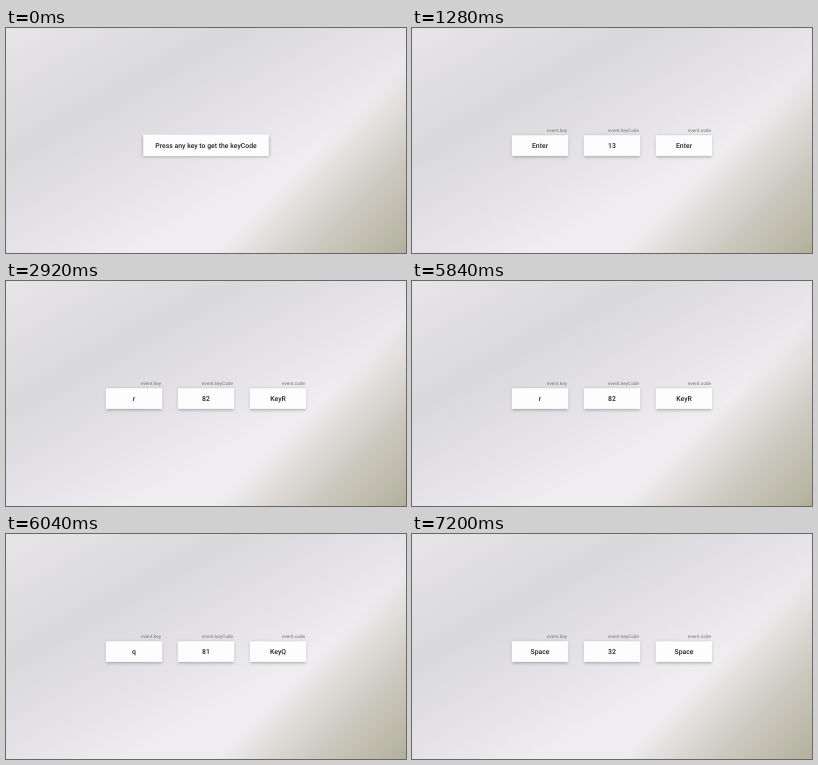
An HTML page with a canvas that plays this animation: 400x225 px, repeating every 8000 ms.

```html
<!DOCTYPE html>
<html lang="en">
<head>
<meta charset="utf-8">
<title>Key codes</title>
<style>
  html, body { margin: 0; width: 100%; height: 100%; overflow: hidden; background: #e4e2e5; }
  canvas { display: block; width: 400px; height: 225px; }
</style>
</head>
<body>
<canvas id="stage" width="400" height="225"></canvas>
<script>
const canvas = document.getElementById('stage');
const ctx = canvas.getContext('2d');
const LOOP = 8000;

// Each key press: start time, event.key, event.keyCode, event.code
const presses = [
  [1280, 'Enter', '13', 'Enter'],
  [2920, 'r', '82', 'KeyR'],
  [4320, 'g', '71', 'KeyG'],
  [5840, 'r', '82', 'KeyR'],
  [5907, 'e', '69', 'KeyE'],
  [5973, 'w', '87', 'KeyW'],
  [6040, 'q', '81', 'KeyQ'],
  [7200, 'Space', '32', 'Space']
];
const labels = ['event.key', 'event.keyCode', 'event.code'];

function fillGradient(x0, y0, x1, y1, stops) {
  const gradient = ctx.createLinearGradient(x0, y0, x1, y1);
  for (const [at, color] of stops) gradient.addColorStop(at, color);
  ctx.fillStyle = gradient;
  ctx.fillRect(0, 0, 400, 225);
}

function drawBackground() {
  fillGradient(0, 0, 192.3, 341.8, [
    [0, '#e7e5e8'], [0.29, '#d9d8db'], [0.5, '#e5e3e7'], [0.66, '#f0edf1'], [1, '#f0edf1']
  ]);
  fillGradient(217, 217, 312.5, 312.5, [
    [0, 'rgba(178,176,156,0)'], [0.14, 'rgba(178,176,156,0.18)'],
    [0.5, 'rgba(178,176,156,0.58)'], [1, 'rgba(178,176,156,1)']
  ]);
}

function drawCard(x, y, w, h) {
  ctx.save();
  ctx.shadowColor = 'rgba(0,0,0,0.32)';
  ctx.shadowBlur = 3;
  ctx.shadowOffsetY = 0.8;
  ctx.fillStyle = '#fefdfe';
  ctx.fillRect(x, y, w, h);
  ctx.restore();
}

// Laid out large and scaled down so that small glyphs keep exact spacing.
function drawText(text, x, y, size, color, align) {
  ctx.save();
  ctx.translate(x, y);
  ctx.scale(1 / 3, 1 / 3);
  ctx.font = `500 ${size * 3}px Roboto, sans-serif`;
  ctx.textRendering = 'geometricPrecision';
  ctx.textAlign = align;
  ctx.fillStyle = color;
  ctx.fillText(text, 0, 0);
  ctx.restore();
}

function drawPrompt() {
  drawCard(137.2, 106.7, 125.6, 21.4);
  drawText('Press any key to get the keyCode', 200, 119.6, 6.87, '#222', 'center');
}

function drawPress(values) {
  labels.forEach((label, i) => {
    const center = 128 + i * 72;
    drawText(label, center + 27, 103.5, 4.7, '#888', 'right');
    drawCard(center - 28.2, 107.2, 56.4, 20.7);
    drawText(values[i], center, 119.8, 6.87, '#222', 'center');
  });
}

function render(now) {
  const time = now % LOOP;
  const press = presses.filter(([start]) => start <= time).pop();
  drawBackground();
  if (press) drawPress(press.slice(1));
  else drawPrompt();
}

const origin = performance.now();
function tick() {
  render(performance.now() - origin);
  requestAnimationFrame(tick);
}
tick();
</script>
</body>
</html>
```
